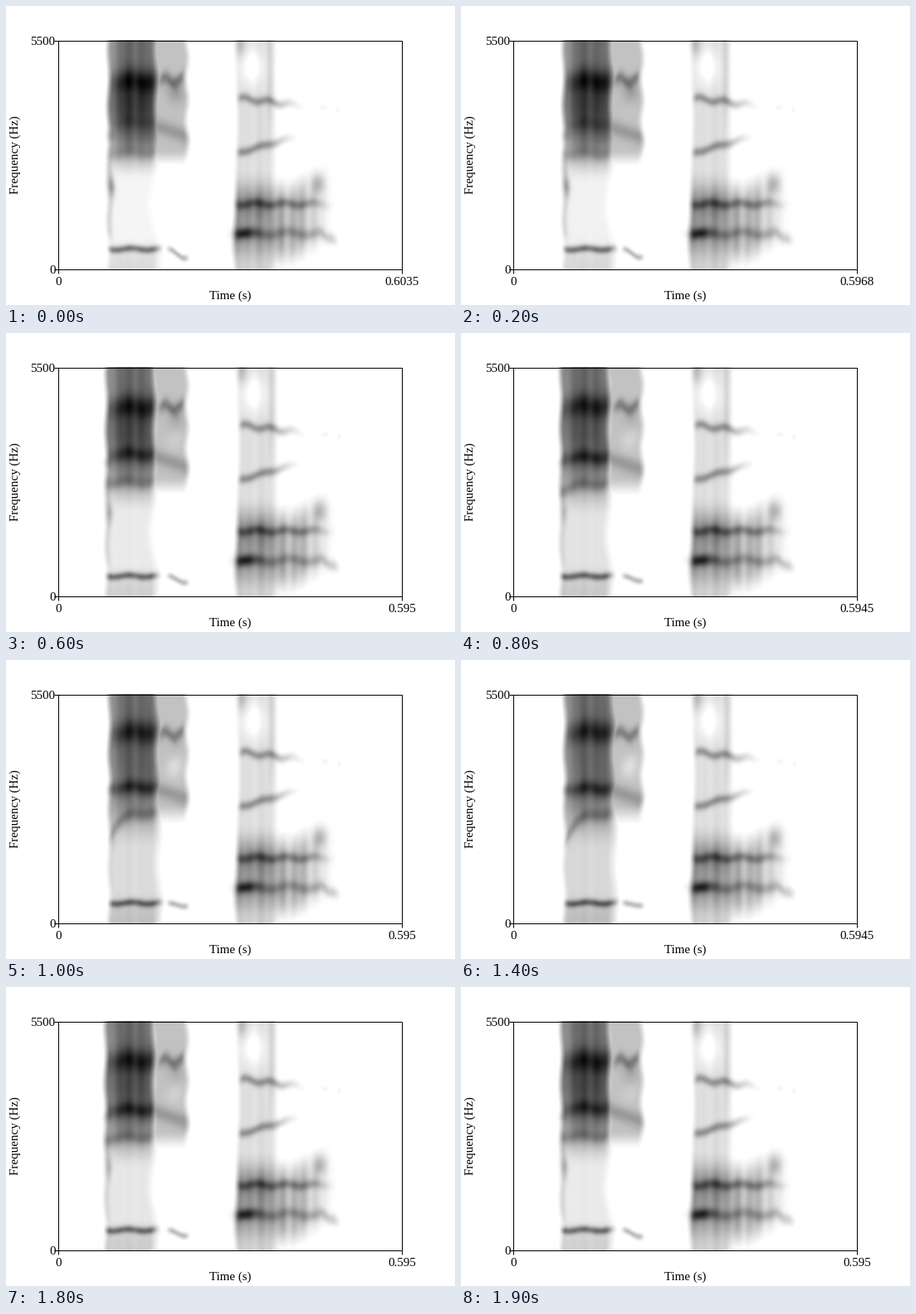
Write a matplotlib script that moves like this. It is 541 px wide and 361 px high and loops after 2000 ms.

```python
import numpy as np
import matplotlib.pyplot as plt
from matplotlib.animation import FuncAnimation

W, H, DPI = 541, 361, 100
LEFT, RIGHT, TOP, BOTTOM = 62, 476, 41, 317
PX = 72 / DPI
X, Y = np.meshgrid(np.arange(LEFT, RIGHT + 1.0), np.arange(TOP, BOTTOM + 1.0))

# Ten takes, stepped up and back down; the first three are held twice as long.
ORDER = [0, 0, 1, 1, 2, 2, *range(3, 10), *range(9, 2, -1)]
DURATION = ["0.6035", "0.5968", "0.5955", "0.595", "0.595",
            "0.5945", "0.5945", "0.595", "0.5945", "0.5944"]


def step(v, a, b):
    """Smooth rise from 0 at a to 1 at b."""
    t = np.clip((v - a) / (b - a), 0, 1)
    return t * t * (3 - 2 * t)


def window(v, lo, hi, rise, fall):
    """Smooth plateau between lo and hi."""
    return step(v, lo, lo + rise) * (1 - step(v, hi - fall, hi))


def line(y, width):
    """Soft horizontal ridge following y."""
    return np.exp(-((Y - y) / width) ** 2)


def blob(x, cx, cy, sx, sy):
    return np.exp(-((x - cx) / sx) ** 2) * line(cy, sy)


def grain(x, amount):
    """Faint vertical streaks."""
    return 1 + amount * (np.sin(x / 2.1) + np.sin(x / 3.7)) / 2


def first_sound(take):
    p = take / 9
    settle = step(take, 0, 4)
    edge = 121 - 4.5 * np.exp(-((take - 4.5) / 2) ** 4) + 2 * p
    u = X - edge - 1.2 * np.sin(Y / 11 + p)
    wave = 1.5 * np.sin(u / 6)

    # Dark upper block fading into a pale lower one.
    pinch = 11 * (1 - p) * line(235, 32)
    body = step(u, -3, 7) * (1 - step(u + pinch, 54, 70))
    core = .6 + .4 * window(u, 0, 72, 24, 28)
    fall = 1 - step(Y, 150, 212 + 22 * p)
    low = .05 + .13 * p
    tone = low + .1 * step(Y, 275, 312) + core * (.6 - low) * fall

    # Formants from top to bottom.
    tone += core * .28 * line(90 - 4 * p + wave, 14)
    tone += core * .2 * (1 - p) * line(118, 28)
    tone += core * (.08 + .17 * settle) * line(141 + 16 * p + wave, 9)
    bend = 36 * step(take, 3, 8) * np.exp(-np.clip(u, 0, None) / 13)
    tone += (.12 + .06 * settle) * line(177 + 9 * p + bend + wave, 8)
    tone += .43 * line(293 + .7 * wave, 4.5)
    d = body * tone * grain(X, .06)

    # Darker rim on the left.
    rim = np.exp(-((u - 4) / 4) ** 2) * window(Y, 175, 290, 25, 20)
    d += (1 - p) * (.12 * rim + .25 * blob(u, 4, 217, 5, 12))
    d += .12 * blob(u, 2, 156, 5, 7)

    # Paler tail on the right.
    t = X - 1.5 * np.sin(Y / 8)
    tail = .25 * (1 - step(Y, 172, 195 + 9 * p))
    tail += .25 * line(89 + 3 * np.sin(t / 3.5), 8) * window(t, 180, 222, 12, 12)
    tail += .16 * line(152 + 14 * p + .35 * (t - 203), 10)
    tail += .14 * (1 - p) * blob(t, 203, 103, 11, 14)
    tail -= .13 * p * blob(t, 203, 128, 10, 14)
    d = np.maximum(d, tail * window(t, 170, 223, 12, 11))

    low_y = 293 + (11 - 9 * p) * step(X, 195, 215)
    d += .27 * line(low_y, 4) * window(X, 190, 223, 10, 9)
    return np.clip(d, 0, 1)


def second_sound(take):
    x = X + 2 * (1 - step(take, 0, 3)) - step(take, 7, 9)

    # Grey column, heavier towards the bottom.
    left = 276 + 3 * line(140, 50) - 3 * line(287, 28)
    column = step(x - left, -3, 7) * (1 - step(x, 316, 331))
    tone = .14 + .26 * step(Y, 195, 245) - .2 * step(Y, 278, 314) - .06 * line(75, 25)
    d = column * (tone + .12 * blob(x, 303, 238, 24, 18)) * grain(x, .12)
    d += .1 * blob(x, 320, 75, 5, 60) + .15 * blob(x, 284, 46, 6, 14)
    d -= .12 * blob(x, 298, 72, 9, 20)

    # Upper ridges.
    y = 110.5 + .12 * (x - 280) + 1.8 * np.sin((x - 296) / 4.5)
    d += .29 * line(y, 5.5) * window(x, 277, 368, 10, 52)
    y = 174.5 - .28 * (x - 290) + np.sin((x - 285) / 5)
    d += .3 * line(y, 5.5) * window(x, 276, 360, 10, 48)

    # Lower ridges.
    y = 238.5 + 1.5 * np.sin(x / 5.5)
    d += .25 * line(y, 6) * window(x, 273, 402, 12, 40)
    y = 274 + 2 * np.sin(x / 7) + 7 * step(x, 378, 390)
    d += .19 * line(y, 7) * window(x, 273, 406, 10, 14)
    d += .3 * blob(x, 289, 274.5, 14, 7)

    # Tail, shorter at the bottom.
    tail = .3 * window(Y + .5 * np.clip(x - 345, 0, None), 200, 322, 42, 40)
    tail *= step(x, 316, 330) * (1 - step(x, 345, 404))
    d += tail * grain(x, .25) + .2 * blob(x, 378, 214, 8, 12)
    d += .05 * (blob(x, 384, 122, 5, 4) + blob(x, 401, 125, 3, 4))
    return np.clip(d, 0, 1)


TAKES = [np.clip(first_sound(k) + second_sound(k) - .01, 0, 1) for k in range(10)]

plt.rcParams["font.family"] = "Liberation Serif"
fig = plt.figure(figsize=(W / DPI, H / DPI), dpi=DPI, facecolor="white")
ax = fig.add_axes([0, 0, 1, 1])
ax.axis("off")
image = ax.imshow(TAKES[0], cmap="gray_r", vmin=0, vmax=1, aspect="auto",
                  interpolation="nearest",
                  extent=(LEFT, RIGHT + 1, BOTTOM + 1, TOP))
ax.set_xlim(0, W)
ax.set_ylim(H, 0)


def stroke(xs, ys):
    ax.plot(np.array(xs) + .5, np.array(ys) + .5, color="black", lw=PX,
            solid_capstyle="butt", solid_joinstyle="miter")


def label(x, y, text, ha="center", **kw):
    return ax.text(x, y, text, ha=ha, va="baseline", fontsize=15 * PX,
                   color="black", **kw)


stroke([LEFT, RIGHT, RIGHT, LEFT, LEFT], [TOP, TOP, BOTTOM, BOTTOM, TOP])
for y in (TOP, BOTTOM):
    stroke([LEFT - 5, LEFT], [y, y])
for x in (LEFT, RIGHT):
    stroke([x, x], [BOTTOM, BOTTOM + 5])

label(59.5, 47, "5500", "right")
label(59.5, 323, "0", "right")
label(63, 337, "0")
label(270.5, 354, "Time (s)")
label(15, 180, "Frequency (Hz)", rotation=90, rotation_mode="anchor")
duration = label(477, 337, DURATION[0])


def draw(i):
    take = ORDER[i]
    image.set_data(TAKES[take])
    duration.set_text(DURATION[take])
    return image, duration


anim = FuncAnimation(fig, draw, frames=len(ORDER), interval=100,
                     repeat=True, repeat_delay=0)
plt.show()
```
